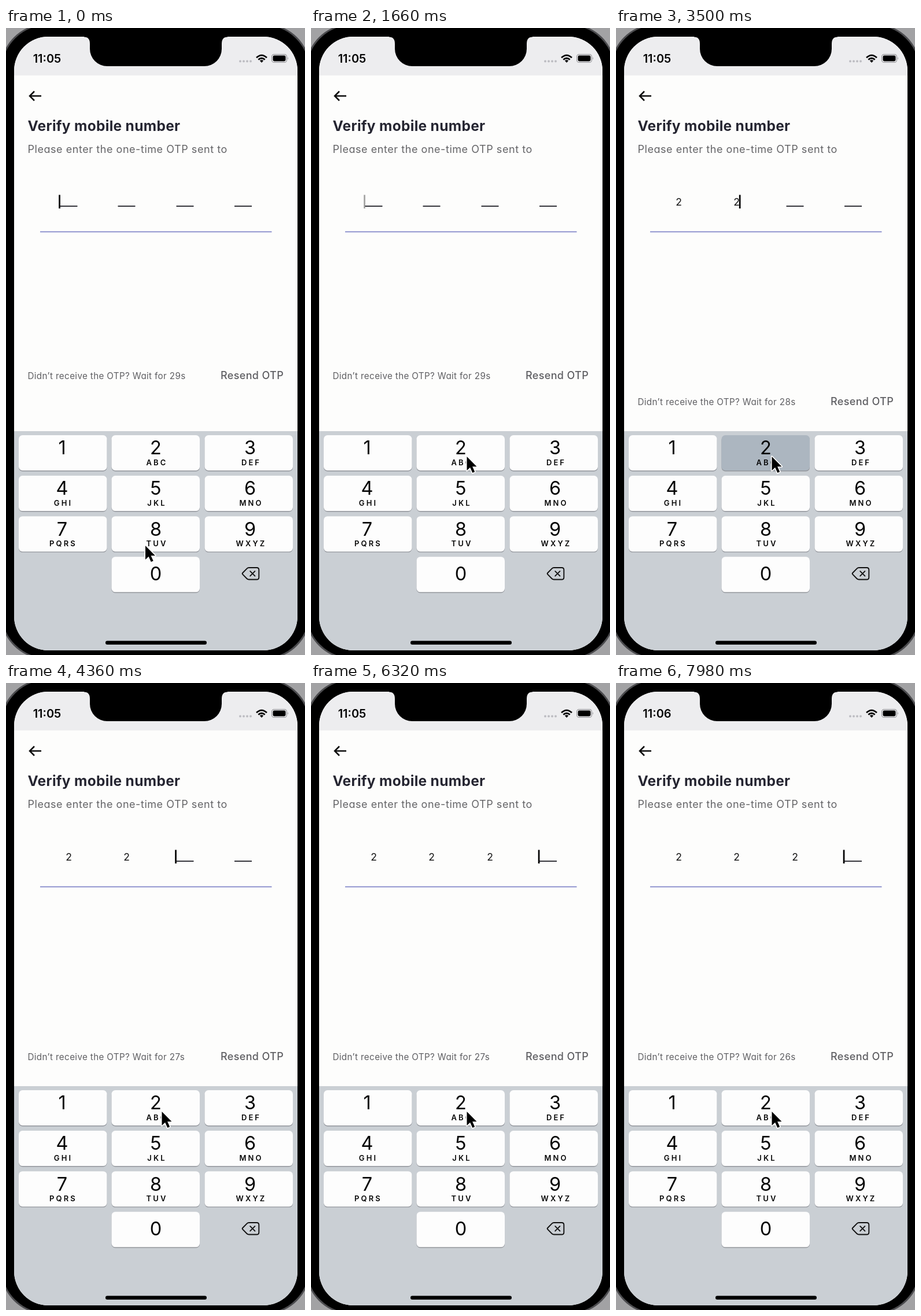
An HTML page that plays this animation: 517 px wide and 1084 px high, repeating every 8 s.

```html
<!DOCTYPE html>
<html lang="en">
<head>
<meta charset="utf-8">
<title>Verify mobile number</title>
<style>
  html, body { margin: 0; width: 100%; height: 100%; overflow: hidden; background: #a2a2a4; }
  svg { display: block; width: 517px; height: 1084px; }
  text { font-family: Inter, "Open Sans", sans-serif; fill: #050505; }
  .copy text { font-feature-settings: "cv11"; }
  .mid { text-anchor: middle; }
  .clock { font-size: 20px; font-weight: 600; }
  .title { font-size: 24.5px; font-weight: 700; letter-spacing: .3px; fill: #252531; }
  .sub { font-size: 18px; letter-spacing: .55px; fill: #646467; }
  .wait { font-size: 15.2px; letter-spacing: .36px; fill: #5e5e62; }
  .resend { font-size: 18px; font-weight: 500; letter-spacing: .35px; fill: #5e5e62; }
  .otp { font-size: 17.5px; fill: #111; }
  .num { font-size: 32.5px; }
  .abc { font-size: 13px; font-weight: 600; letter-spacing: 3.1px; }
</style>
</head>
<body>
<svg viewBox="0 0 517 1084">
  <defs>
    <clipPath id="screen"><rect x="14" y="15" width="490" height="1061" rx="59"/></clipPath>
  </defs>
  <rect x="-8" y="-6" width="533" height="1096" rx="78" stroke="#4c4c4f" stroke-width="3"/>
  <g clip-path="url(#screen)">
    <rect width="517" height="1084" fill="#fdfdfc"/>
    <rect width="517" height="82" fill="#ededef"/>
    <rect y="697" width="517" height="387" fill="#cacfd4"/>
  </g>
  <path d="M135 14V15.5Q145 15.5 145 27V36A30 30 0 0 0 175 66H343A30 30 0 0 0 373 36V27Q373 15.5 383 15.5V14Z"/>

  <text id="clock" class="clock mid" x="71" y="60">11:05</text>
  <g fill="#bdbdc2">
    <circle cx="405" cy="57.5" r="2"/><circle cx="411" cy="57.5" r="2"/>
    <circle cx="417" cy="57.5" r="2"/><circle cx="423" cy="57.5" r="2"/>
  </g>
  <g fill="none" stroke="#050505" stroke-width="2.7">
    <path d="M433 51.3Q442 42.8 451 51.3M436.3 54.8Q442 49.7 447.7 54.8"/>
    <path d="M438.8 56.5Q442 53.8 445.2 56.5L442 60Z" fill="#050505" stroke="none"/>
  </g>
  <rect x="459.6" y="45.6" width="25.8" height="13.8" rx="4" fill="none" stroke="#97979b" stroke-width="1.2"/>
  <rect x="461.5" y="47.5" width="22" height="10" rx="2.4"/>
  <path d="M487 50.3Q489 52.5 487 54.7Z" fill="#97979b"/>

  <path d="M61 117.5H41.5M49 109.5L41 117.5L49 125.5" fill="none" stroke="#0b0b0b" stroke-width="2.5"/>
  <g class="copy">
    <text class="title" x="37.5" y="178">Verify mobile number</text>
    <text class="sub" x="37.5" y="216">Please enter the one-time OTP sent to</text>
    <g id="row">
      <text id="wait" class="wait" x="37.5" y="607"></text>
      <text class="resend" x="371" y="607">Resend OTP</text>
    </g>
  </g>
  <g id="slots"></g>
  <rect id="caret" y="288.5" width="2.7" height="23.5"/>
  <path d="M59 352.3H459.5" stroke="#8287c9" stroke-width="1.7"/>

  <g id="keys"></g>
  <g fill="none" stroke="#111" stroke-width="1.9" stroke-linejoin="round" stroke-linecap="round">
    <path d="M409.3 942L416.5 934.6Q418 933 420.2 933H433.5Q437.3 933 437.3 936.8V949.7Q437.3 953.5 433.5 953.5H420.2Q418 953.5 416.5 952L409.3 944.6Q408 943.3 409.3 942Z"/>
    <path d="M422.2 939.2L430.4 947.4M430.4 939.2L422.2 947.4"/>
  </g>
  <rect x="172" y="1059.5" width="175" height="6.5" rx="3.2"/>
  <path id="pointer" d="M1 2V26L6.6 20.7L10.8 30L14.7 28.2L10.6 19.2H18Z" stroke="#fff" stroke-width="3.2" paint-order="stroke" stroke-linejoin="round"/>
</svg>
<script>
const LOOP = 8000;
const PRESS = [1800, 3420, 5020];   // taps on key 2
const HOLD = 340, ADVANCE = 300;    // key highlight, delay before the next slot
const SLOT_X = [108.5, 208.5, 309.5, 410];
const TICKS = [2000, 4300, 6600];   // countdown changes
const NEW_MINUTE = 7000;
const BLINK = { period: 2300, on: 1200, out: 1650, off: 1850, lead: 347 };

const $ = id => document.getElementById(id);
function add(parent, tag, attrs, text) {
  const el = document.createElementNS('http://www.w3.org/2000/svg', tag);
  for (const k in attrs) el.setAttribute(k, attrs[k]);
  if (text) el.textContent = text;
  parent.append(el);
  return el;
}
const count = (times, t) => times.filter(x => t >= x).length;
const ramp = (t, a, b) => Math.min(1, Math.max(0, (t - a) / (b - a)));
const ease = p => p * p * (3 - 2 * p);

const slots = SLOT_X.map(x => ({
  digit: add($('slots'), 'text', { class: 'otp mid', x, y: 306.5 }, '2'),
  dash: add($('slots'), 'rect', { x: x - 15, y: 307.2, width: 30, height: 1.7, fill: '#15151c' })
}));

const letters = ['', 'ABC', 'DEF', 'GHI', 'JKL', 'MNO', 'PQRS', 'TUV', 'WXYZ'];
function addKey(num, col, row, abc) {
  const x = [22, 182.5, 343.5][col], y = 704 + 70.1 * row, g = $('keys');
  const box = { x, width: 152.5, height: 61, rx: 6.5 };
  add(g, 'rect', { ...box, y: y + 1.4, fill: '#93969c' });
  const face = add(g, 'rect', { ...box, y, fill: '#fdfdfd' });
  const cx = [97, 259, 422][col];
  add(g, 'text', { class: 'num mid', x: cx, y: y + (num ? 33.3 : 40.7) }, String(num));
  if (abc) add(g, 'text', { class: 'abc mid', x: cx + 2, y: y + 51.8 }, abc);
  return face;
}
const faces = letters.map((abc, i) => addKey(i + 1, i % 3, Math.floor(i / 3), abc));
addKey(0, 1, 3);

function caretAlpha(age) {
  const p = age % BLINK.period;
  return p < BLINK.off ? 1 - ramp(p, BLINK.on, BLINK.out) : ramp(p, BLINK.off, BLINK.period);
}

function draw(t) {
  const typed = count(PRESS, t);
  const active = count(PRESS.map(x => x + ADVANCE), t);
  const last = PRESS[typed - 1];

  slots.forEach((s, i) => {
    s.digit.setAttribute('visibility', i < typed ? 'visible' : 'hidden');
    s.dash.setAttribute('visibility', i < typed ? 'hidden' : 'visible');
  });

  const after = typed > active;
  $('caret').setAttribute('x', SLOT_X[active] + (after ? 4.3 : -17.3));
  const age = after ? 0 : active ? t - last - ADVANCE : t + BLINK.lead;
  $('caret').setAttribute('opacity', caretAlpha(age));

  const down = typed > 0 && t < last + HOLD;
  faces[1].setAttribute('fill', down ? '#acb6c0' : '#fdfdfd');

  $('wait').textContent = `Didn’t receive the OTP? Wait for ${29 - count(TICKS, t)}s`;
  $('row').setAttribute('transform', `translate(0 ${44.5 * ease(ramp(t, 1960, 2240))})`);
  $('clock').textContent = t < NEW_MINUTE ? '11:05' : '11:06';

  const m = ease(ramp(t, 60, 1250));
  $('pointer').setAttribute('transform', `translate(${240 + 28.5 * m} ${893 - 154 * m})`);
}

const start = performance.now();
function frame() {
  draw((performance.now() - start) % LOOP);
  requestAnimationFrame(frame);
}
draw(0);
requestAnimationFrame(frame);
</script>
</body>
</html>
```
